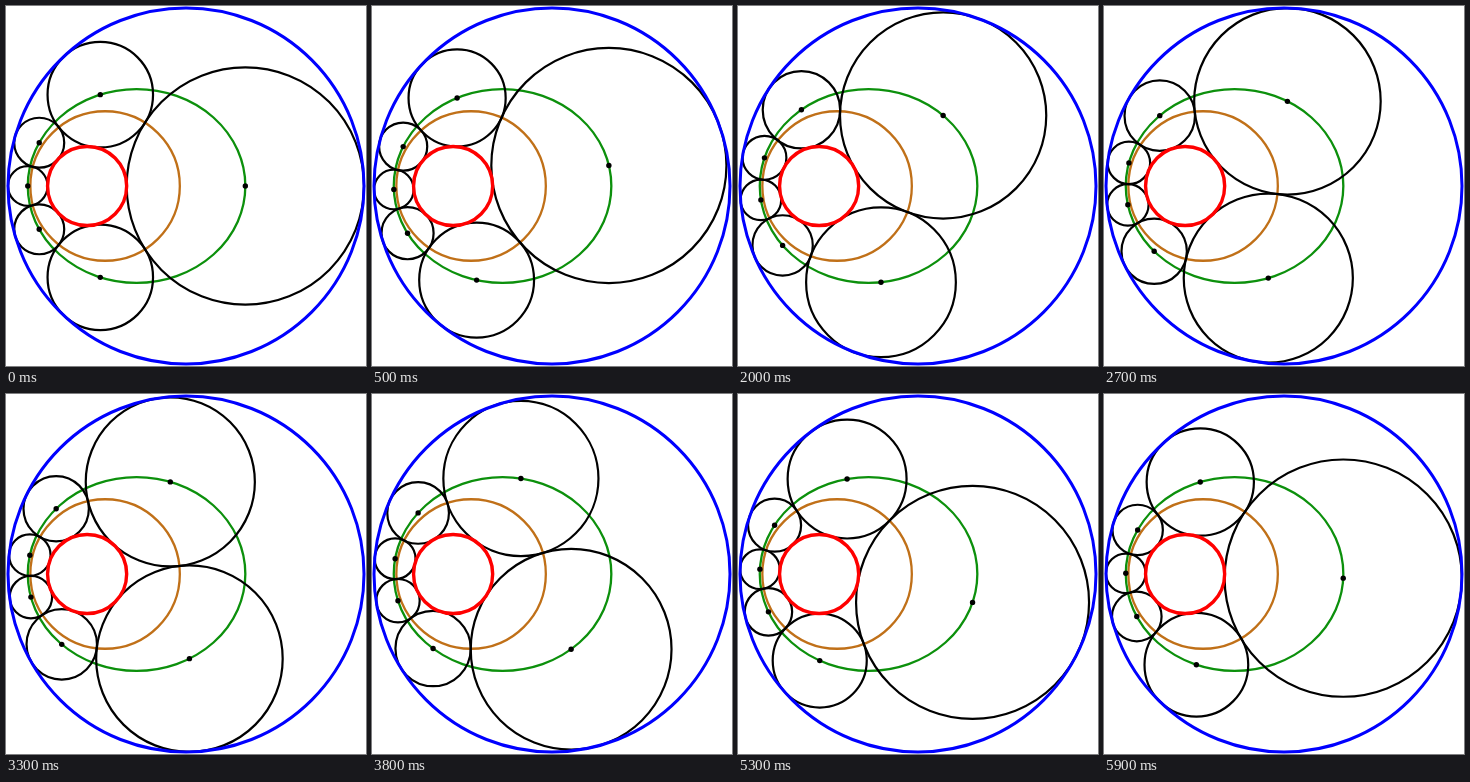
These frames come from a looping animation (360x360 px, 6000 ms). An HTML page with a canvas:

```html
<!DOCTYPE html>
<html lang="en">
<head>
<meta charset="utf-8">
<title>Steiner chain</title>
<style>
  html, body { margin: 0; width: 100%; height: 100%; overflow: hidden; background: #fff; }
  canvas { display: block; width: 360px; height: 360px; }
</style>
</head>
<body>
<canvas id="stage" width="360" height="360"></canvas>
<script>
const ctx = document.getElementById("stage").getContext("2d");
const CENTER = 180, RADIUS = 178;
const LOOP = 6000, STEP = 100, COUNT = 6;
const SHIFT = -0.6;      // Moebius map z -> (z + a) / (1 + a z) of the unit disk
const INNER = 1 / 3;     // inner radius of the concentric chain of six

// Image of the circle at distance d and angle t, with radius r, in stage pixels.
function mapCircle(d, t, r) {
  const a = SHIFT, x = d * Math.cos(t), y = d * Math.sin(t);
  const scale = RADIUS / (1 + 2 * a * x + a * a * (d * d - r * r));
  return {
    x: CENTER + scale * ((1 + a * a) * x + a * (1 + d * d - r * r)),
    y: CENTER - scale * (1 - a * a) * y,
    r: scale * (1 - a * a) * r
  };
}

function strokeEllipse(x, y, rx, ry, color, width) {
  ctx.beginPath();
  ctx.ellipse(x, y, rx, ry, 0, 0, 2 * Math.PI);
  ctx.strokeStyle = color;
  ctx.lineWidth = width;
  ctx.stroke();
}

function strokeCircle(c, color, width) {
  strokeEllipse(c.x, c.y, c.r, c.r, color, width);
}

const outer = { x: CENTER, y: CENTER, r: RADIUS };
const inner = mapCircle(0, 0, INNER);
const tangency = mapCircle(0, 0, Math.sqrt(INNER));

// The chain's centers lie on an ellipse with the two fixed centers as foci.
const focal = (outer.x - inner.x) / 2;
const major = (outer.r + inner.r) / 2;
const minor = Math.sqrt(major * major - focal * focal);

function draw(time) {
  const turn = Math.floor((time % LOOP) / STEP) * STEP / LOOP;
  const chain = Array.from({ length: COUNT }, (_, i) =>
    mapCircle((1 + INNER) / 2, (i + turn) * 2 * Math.PI / COUNT, (1 - INNER) / 2));

  ctx.fillStyle = "#fff";
  ctx.fillRect(0, 0, 360, 360);
  strokeCircle(tangency, "#c07018", 2.3);
  strokeEllipse(outer.x - focal, CENTER, major, minor, "#0c900c", 2.3);
  ctx.fillStyle = "#000";
  for (const c of chain) {
    strokeCircle(c, "#000", 2.2);
    ctx.beginPath();
    ctx.arc(c.x, c.y, 2.7, 0, 2 * Math.PI);
    ctx.fill();
  }
  strokeCircle(inner, "#f00", 3.4);
  strokeCircle(outer, "#00f", 3);
}

const start = performance.now();
function tick() {
  draw(performance.now() - start);
  requestAnimationFrame(tick);
}
tick();
</script>
</body>
</html>
```
